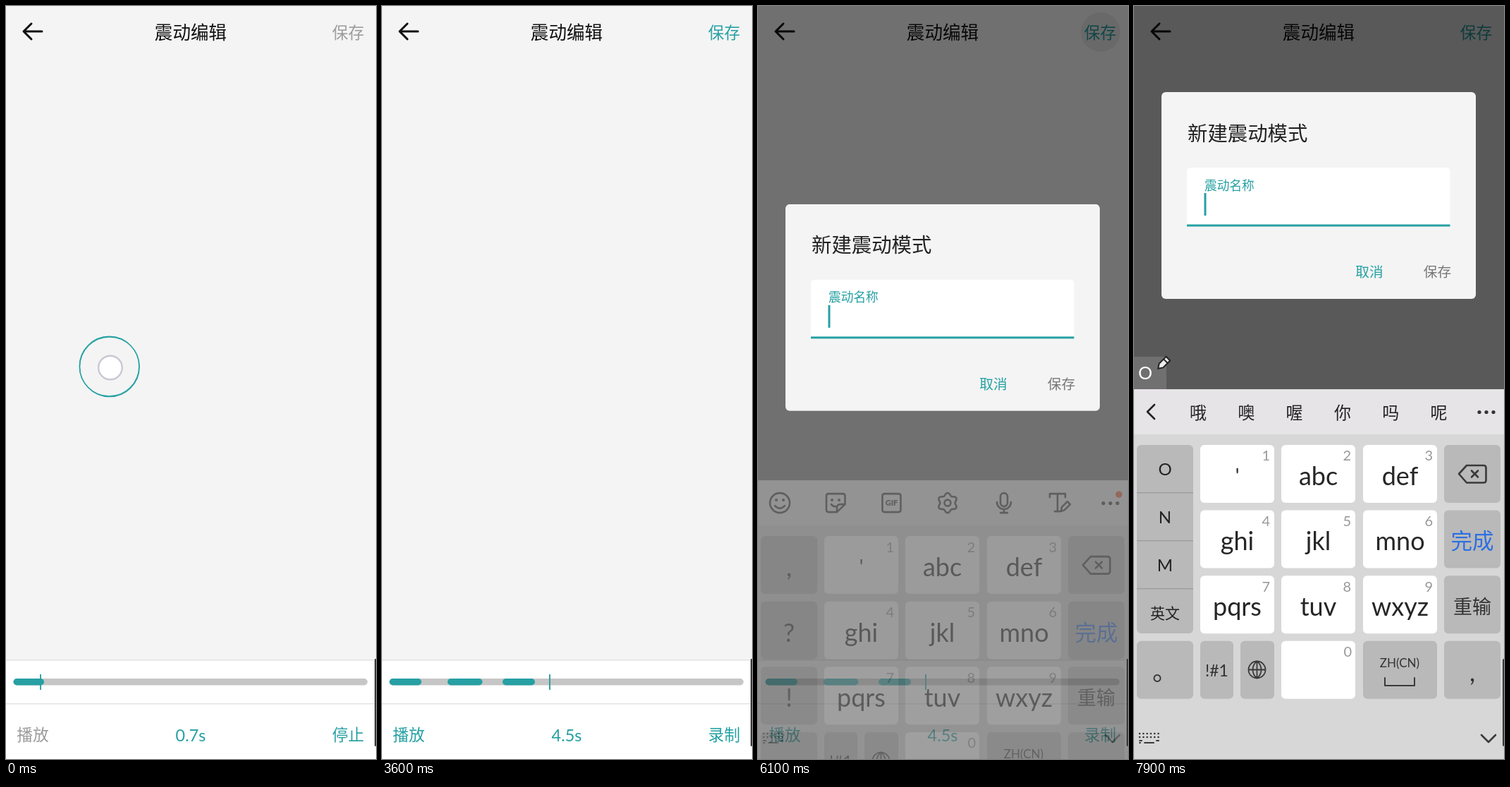
Recreate the animation shown at these times as an HTML page. Size 525 by 1067 pixels, loop 8000 ms.

```html
<!DOCTYPE html>
<html lang="zh-CN">
<head>
<meta charset="utf-8">
<title>震动编辑</title>
<style>
html, body { margin: 0; width: 100%; height: 100%; overflow: hidden; background: #f4f4f4; }
svg { display: block; width: 100vw; height: 100vh; font-family: Lato, "Noto Sans CJK SC", sans-serif; }
.line { fill: none; stroke: #3a3a3a; stroke-width: 2.6; stroke-linecap: round; stroke-linejoin: round; }
.layer { animation: 8s linear infinite; }
.cut { animation-timing-function: step-end; }

/* recording */
@keyframes marker {
  0% { transform: translateX(49px); animation-timing-function: steps(13); }
  16.25% { transform: translateX(127px); animation-timing-function: steps(18); }
  38.75%, 100% { transform: translateX(238px); }
}
@keyframes pulse1 { 0% { width: 43.5px; } 1.25%, 100% { width: 45.5px; } }
@keyframes pulse2 {
  0% { width: 0; animation-timing-function: step-end; }
  10% { width: 9px; animation-timing-function: steps(7); }
  18.75%, 100% { width: 49.5px; }
}
@keyframes pulse3 {
  0% { width: 0; animation-timing-function: step-end; }
  26.25% { width: 8.5px; animation-timing-function: steps(6); }
  33.75%, 100% { width: 46px; }
}
@keyframes recording { 0% { opacity: 1; } 38.75%, 100% { opacity: 0; } }
@keyframes recorded { 0% { opacity: 0; } 38.75%, 100% { opacity: 1; } }

/* touches */
@keyframes touch1 { 0% { opacity: 1; } 1.25%, 100% { opacity: 0; } }
@keyframes touch2 { 0%, 18.75%, 100% { opacity: 0; } 10% { opacity: 1; } }
@keyframes touch3 { 0%, 33.75%, 100% { opacity: 0; } 26.25% { opacity: 1; } }
@keyframes touchStop { 0%, 40%, 100% { opacity: 0; } 37.5% { opacity: 1; } }
@keyframes touchMiss1 { 0%, 52.5%, 100% { opacity: 0; } 50% { opacity: 1; } }
@keyframes touchMiss2 { 0%, 63.75%, 100% { opacity: 0; } 60% { opacity: 1; } 62.5% { opacity: .25; } }
@keyframes touchSave { 0%, 72.5%, 100% { opacity: 0; } 70% { opacity: 1; } }
@keyframes touchKey { 0%, 93.75%, 100% { opacity: 0; } 91.25% { opacity: 1; } }
@keyframes rippleStop { 0%, 37.5%, 45%, 100% { opacity: 0; } 38.75%, 41.25% { opacity: .12; } }
@keyframes rippleSave { 0%, 70%, 77.5%, 100% { opacity: 0; } 72.5%, 75% { opacity: .13; } }

/* dialog and keyboard */
@keyframes scrim { 0%, 72.5% { opacity: 0; } 75% { opacity: .435; } 77.5%, 100% { opacity: .635; } }
@keyframes dialogFade { 0%, 72.5% { opacity: 0; } 73.75% { opacity: .5; } 75% { opacity: .96; } 76.25%, 100% { opacity: 1; } }
@keyframes dialogMove {
  0%, 75% { transform: translateY(387px); }
  76.25% { transform: translateY(282px); }
  77.5% { transform: translateY(169px); }
  78.75% { transform: translateY(134px); }
  80%, 100% { transform: translateY(122px); }
}
@keyframes label {
  0%, 73.75% { transform: translate(100px, 158px) scale(1.36); }
  75% { transform: translate(100px, 143px) scale(1.06); }
  76.25%, 100% { transform: translate(100px, 138.5px); }
}
@keyframes caret { 0%, 80%, 90% { opacity: 0; } 73.75%, 85%, 92.5%, 100% { opacity: 1; } }
@keyframes boardFade { 0%, 75% { opacity: 0; } 76.25% { opacity: .3; } 77.5% { opacity: .64; } 78.75% { opacity: .9; } 80%, 100% { opacity: 1; } }
@keyframes boardMove {
  0%, 75% { transform: translateY(240px); }
  76.25% { transform: translateY(130px); }
  77.5% { transform: translateY(41px); }
  78.75% { transform: translateY(10px); }
  80%, 100% { transform: none; }
}
@keyframes idle { 0% { opacity: 1; } 92.5%, 100% { opacity: 0; } }
@keyframes typed { 0% { opacity: 0; } 92.5%, 100% { opacity: 1; } }
</style>
</head>
<body>
<svg id="stage" viewBox="0 0 525 1067" preserveAspectRatio="none"></svg>
<script>
const TEAL = '#26a0a3', GREY = '#9b9b9b', KEY_GREY = '#b9b9b9';

const text = (x, cy, size, str, fill = '#222', extra = 'text-anchor="middle"') =>
  `<text x="${x}" y="${cy + size * .37}" font-size="${size}" fill="${fill}" ${extra}>${str}</text>`;
const box = (x, y, w, h, fill, rx = 0, extra = '') =>
  `<rect x="${x}" y="${y}" width="${w}" height="${h}" fill="${fill}" rx="${rx}" ${extra}/>`;
const disc = (x, y, r, fill, extra = '') => `<circle cx="${x}" cy="${y}" r="${r}" fill="${fill}" ${extra}/>`;
const line = (d, extra = '') => `<path class="line" d="${d}" ${extra}/>`;
const layer = (name, body, cls = '') => `<g class="layer ${cls}" style="animation-name:${name}">${body}</g>`;
const cut = (name, body) => layer(name, body, 'cut');
const at = (x, y, body) => `<g transform="translate(${x} ${y})">${body}</g>`;

const finger = (x, y) => disc(x, y, 16.8, '#fff', 'stroke="#c9c8d3" stroke-width="2.4"');
const ring = (x, y, width = 1.3) => disc(x, y, 42.3, 'none', `stroke="${TEAL}" stroke-width="${width}"`);
const pulse = (name, x) => box(x, 953, 0, 9.5, TEAL, 4.75, `class="layer" style="animation-name:${name}"`);

function editor() {
  return box(0, 0, 525, 1067, '#f4f4f4')
    + line('M51 36H25M36 25L25 36L36 47', 'style="stroke:#111;stroke-width:3"')
    + text(262, 38, 25.6, '震动编辑', '#111')
    + box(0, 926, 525, 141, '#fff') + box(0, 926, 525, 1.5, '#e2e2e2') + box(0, 988, 525, 1.5, '#e4e4e4')
    + box(10.5, 953, 502.5, 9.5, '#c6c6c6', 4.75)
    + pulse('pulse1', 10.5) + pulse('pulse2', 93) + pulse('pulse3', 171)
    + `<g id="marker" class="layer" style="animation-name:marker">${box(-.9, 947, 1.9, 22, TEAL)}</g>`
    + text(262, 1033, 23.5, '0.7s', TEAL, 'id="clock" text-anchor="middle"')
    + cut('recording', text(485.5, 37.5, 22.7, '保存', GREY) + text(38, 1033, 22.7, '播放', GREY)
      + text(485.5, 1033, 22.7, '停止', TEAL))
    + cut('recorded', text(485.5, 37.5, 22.7, '保存', TEAL) + text(38, 1033, 22.7, '播放', TEAL)
      + text(485.5, 1033, 22.7, '录制', TEAL))
    + layer('rippleStop', disc(486, 1033, 28, '#000'))
    + layer('rippleSave', disc(486, 37, 28, '#000'))
    + cut('touch1', ring(146.5, 510.5) + ring(147, 511.3) + finger(148, 512.5))
    + cut('touch2', ring(199.5, 553) + finger(200.5, 554))
    + cut('touch3', ring(252, 552) + finger(253, 553))
    + cut('touchStop', finger(495, 1031))
    + cut('touchMiss1', finger(494, 68))
    + cut('touchMiss2', finger(498.5, 75))
    + cut('touchSave', finger(487, 40))
    + box(523, 925, 4, 124, '#3a3a3a', 2);
}

function dialog() {
  const body = box(39, 0, 446, 293, '#f4f4f4', 6)
    + text(76, 58, 28.4, '新建震动模式', '#222', '')
    + `<path d="M75 190V113q0-6 6-6H442.500q6 0 6 6V190Z" fill="#fff"/>`
    + box(75, 187.500, 373.500, 3, TEAL)
    + layer('label', `<text font-size="17.7" fill="${TEAL}">震动名称</text>`)
    + cut('caret', box(99.500, 143, 3, 32, TEAL))
    + text(334, 255, 19.7, '取消', TEAL) + text(430.500, 255, 19.7, '保存', '#777');
  return layer('dialogFade', layer('dialogMove', body));
}

const COLS = [[4, 80], [94, 105], [209, 105], [325, 105], [440, 80]];
const rowTop = row => 622 + row * 92.6;

function key(col, row, label = '', size = 36, fill = '#fff', color = '#262626') {
  const [x, w] = COLS[col], y = rowTop(row);
  return box(x, y, w, 82, fill, 6) + text(x + w / 2, y + 43.5, size, label, color);
}

function gearPath() {
  const points = Array.from({ length: 49 }, (_, i) => {
    const a = i * Math.PI / 24, r = 12.4 + 1.8 * Math.cos(6 * a);
    return `${(r * Math.sin(a)).toFixed(1)} ${(r * Math.cos(a)).toFixed(1)}`;
  });
  return 'M' + points.join('L') + 'Z';
}

function toolbar() {
  const eyes = disc(-5, -4, 2, '#3a3a3a') + disc(5, -4, 2, '#3a3a3a');
  return at(31, 575, line('M-14 0a14 14 0 1 0 28 0a14 14 0 1 0-28 0M-7 4Q0 11 7 4') + eyes)
    + at(110, 575, line('M13.500 2V-10q0-3-3-3H-10q-3 0-3 3V10q0 3 3 3H2L13.500 2H7q-5 0-5 5V13M-6 2Q-3 6 1 5') + eyes)
    + at(189.500, 575, line('M-10-13H10q3 0 3 3V10q0 3-3 3H-10q-3 0-3-3V-10q0-3 3-3Z')
      + text(0, 0, 11, 'GIF', '#3a3a3a', 'text-anchor="middle" font-weight="900"'))
    + at(269, 575, line(gearPath()) + line('M-4.500 0a4.500 4.500 0 1 0 9 0a4.500 4.500 0 1 0-9 0'))
    + at(349, 575, line('M-5-9a5 5 0 0 1 10 0V0a5 5 0 0 1-10 0ZM-10-1a10 10 0 0 0 20 0M0 9V14M-5 14H5'))
    + at(428, 575, line('M-14-8V-13H8V-8M-3-13V12M-7 12H0M2 12L3 6L11-2L15 2L7 10Z'))
    + disc(512, 563, 4.700, '#e0592a');
}

function candidates() {
  return line('M29 565L19 575L29 585', 'style="stroke:#222"')
    + [...'哦噢喔你吗呢'].map((c, i) => text(91 + i * 68.3, 576, 24, c)).join('');
}

function keyboard() {
  const labels = ["'", 'abc', 'def', 'ghi', 'jkl', 'mno', 'pqrs', 'tuv', 'wxyz'];
  const letters = labels.map((s, i) => key(1 + i % 3, Math.floor(i / 3), s, i ? 36 : 28)).join('') + key(2, 3);
  const digit = (x, y, n) => text(x, y + 15, 20, n, '#999', 'text-anchor="end"');
  const digits = labels.map((_, i) => {
    const [x, w] = COLS[1 + i % 3];
    return digit(x + w - 6, rowTop(Math.floor(i / 3)), i + 1);
  }).join('') + digit(309, rowTop(3), 0);

  const grey = (col, row, label, size, color = '#333') => key(col, row, label, size, KEY_GREY, color);
  const y = rowTop(3);
  const functions = grey(4, 0)
    + line('M472 651H496q3.500 0 3.500 3.500V672q0 3.500-3.500 3.500H472L461 663ZM479 658.500L488 667.500M488 658.500L479 667.500')
    + grey(4, 1, '完成', 30.6, '#2c6fe3') + grey(4, 2, '重输', 27)
    + grey(0, 3) + text(44, 943, 36, '。', '#333')
    + box(94, y, 47, 82, KEY_GREY, 6) + text(117.5, 941, 23, '!#1', '#333')
    + box(151, y, 48, 82, KEY_GREY, 6)
    + at(174.5, 940.5, line('M-12 0a12 12 0 1 0 24 0a12 12 0 1 0-24 0M-12 0H12M0-12V12M0-12C-8-6-8 6 0 12M0-12C8-6 8 6 0 12',
      'style="stroke-width:1.8"'))
    + grey(3, 3) + text(377, 931, 17, 'ZH(CN)', '#333') + line('M356 952V963H398V952', 'style="stroke-width:2"')
    + grey(4, 3, ',', 36);

  const punctuation = [',', '?', '!'].map((s, i) => grey(0, i, s, 36)).join('');
  const choices = box(4, 622, 80, 267, KEY_GREY, 6)
    + [689, 757, 825].map(top => box(4, top, 80, 1.3, '#9c9c9c')).join('')
    + ['O', 'N', 'M', '英文'].map((s, i) => text(44, 656 + i * 68, i < 3 ? 24 : 21, s)).join('');
  const composing = box(0, 497, 46, 46, '#707070') + text(16, 520, 25, 'O', '#fff')
    + at(42, 506, '<path transform="rotate(45)" d="M-4-9H4V5L0 11L-4 5ZM-4-4H4" fill="#eee" stroke="#222" stroke-width="2"/>');

  const moving = box(0, 543, 525, 700, '#d7d7d7') + box(0, 543, 525, 64, '#e6e4e6')
    + [490, 500, 510].map(x => disc(x, 575.5, 2.6, '#333')).join('')
    + letters + digits + functions
    + cut('idle', toolbar() + punctuation)
    + cut('typed', candidates() + choices + composing)
    + cut('touchKey', box(325, rowTop(1), 105, 82, 'rgba(0,0,0,.1)', 6) + finger(378, 764));
  const dots = line('M8 1031H35M8 1036H35', 'style="stroke-dasharray:.1 5.200"')
    + line('M8 1041H11M15 1044H28M32 1041H35M8 1044H9', 'style="stroke-width:2"');
  const fixed = dots + line('M493 1033L503 1043L513 1033');
  return layer('boardFade', layer('boardMove', moving) + fixed);
}

document.getElementById('stage').innerHTML = editor()
  + layer('scrim', box(0, 0, 525, 1067, '#000')) + dialog() + keyboard() + box(523, 925, 4, 124, '#3a3a3a', 2);

const clock = document.getElementById('clock');
const [timeline] = document.getElementById('marker').getAnimations();

function tick() {
  const ms = Math.floor((timeline.currentTime || 0) % 8000 / 100) * 100;
  const seconds = ms < 3100 ? .767 + ms * .001195 : 4.53;
  clock.textContent = (Math.floor(seconds * 10) / 10).toFixed(1) + 's';
  requestAnimationFrame(tick);
}
tick();
</script>
</body>
</html>
```
